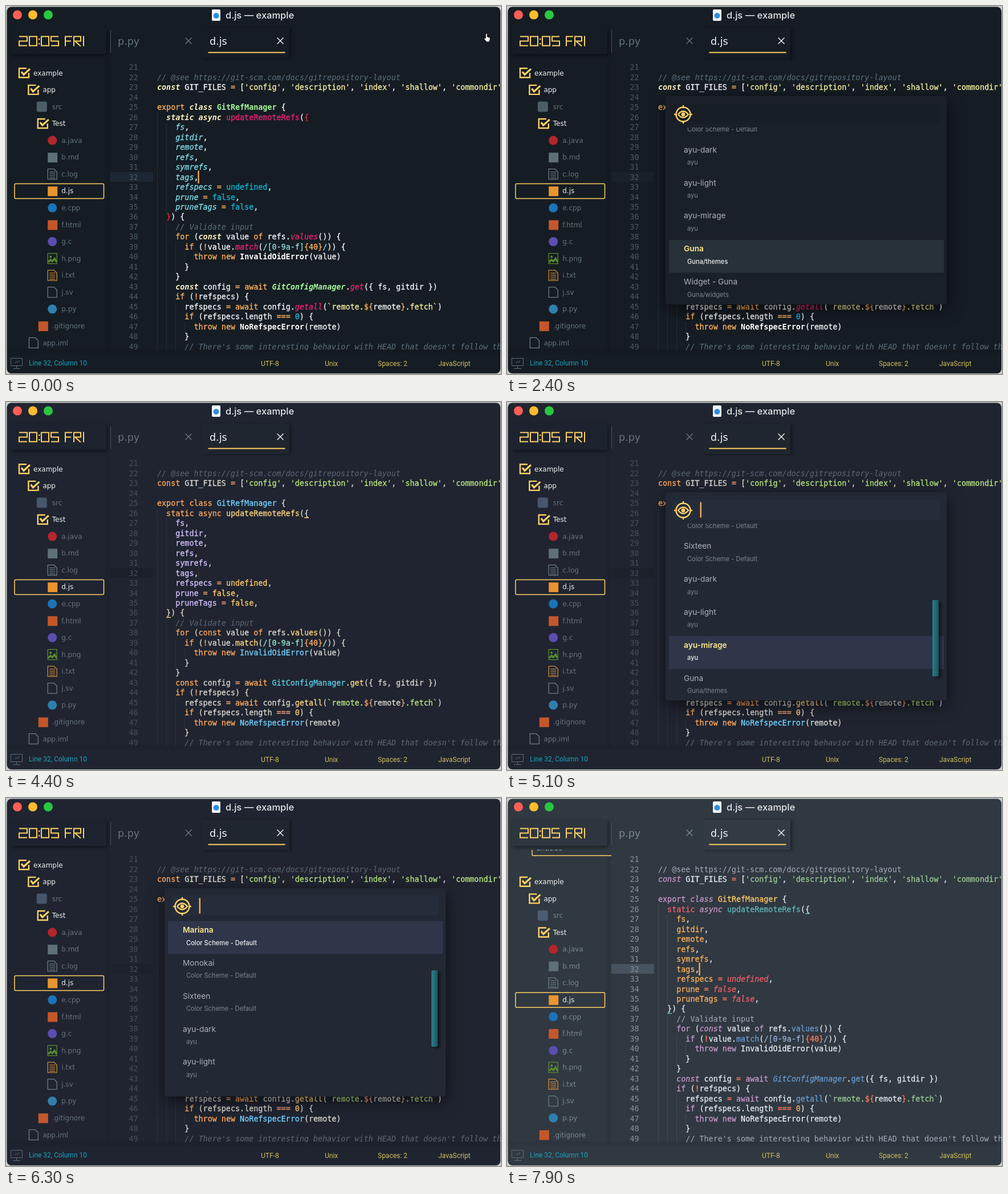
These frames come from a looping animation (868 by 645 pixels, 8000 ms). An HTML page with a canvas:

```html
<!DOCTYPE html>
<html lang="en">
<head>
<meta charset="utf-8">
<title>Editor colour schemes</title>
<style>
html, body { margin: 0; width: 100%; height: 100%; overflow: hidden; background: #c9ccc9; }
canvas { display: block; }
</style>
</head>
<body>
<canvas id="stage" width="868" height="645"></canvas>
<script>
const ctx = document.getElementById('stage').getContext('2d');
const LOOP = 8000, TICK = 100, GOLD = '#ffd166', CARET = '#f2a65a';
const UI = '"DejaVu Sans", sans-serif', MONO = '"DejaVu Sans Mono", monospace';
const INTER = 'Inter, sans-serif', ROBOTO = 'Roboto, sans-serif';

// Token styles: optional flags (b bold, i italic, u underlined), then the colour.
const themes = [
  { bg: '#151c23', raised: '#151c23', tab: '#151c23', panel: '#1a2027', input: '#171e26', row: '#27313a',
    line: '#1d2733', blurred: '#19212a', gutter: '#4a5a66', guide: '#232c34', dim: '#63747d', folder: '#4c5f69',
    comment: 'i#5c6f7b', string: '#f8f0a0', keyword: '#fcaf5c', storage: 'bi#fbf0c0', modifier: 'bi#fbf0c0',
    cls: 'b#a5f69c', ref: 'bi#a5f69c', fn: '#e6266f', param: 'i#7fe0ee', constant: '#12b3d8', number: '#12b3d8',
    method: 'i#e6266f', error: 'b#ffffff', op: '#fcaf5c', regex: '#8fd8dc', quant: '#fcaf5c', pair: '#e02c34', text: '#f4f6f8' },
  { bg: '#1f2430', raised: '#1d232e', tab: '#20262f', panel: '#222834', input: '#252c3a', row: '#2f364a',
    line: '#1a1f2a', blurred: '#1c212c', gutter: '#474e5a', guide: '#2a303c', dim: '#68737d', folder: '#47566a',
    comment: 'i#5c6773', string: '#bae67e', keyword: '#ffa759', storage: '#ffa759', modifier: '#ffa759',
    cls: '#73d0ff', ref: '#5ccfe6', fn: '#ffd580', param: '#d4bfff', constant: '#ffcc66', number: '#ffcc66',
    method: '#ffd580', error: '#73d0ff', op: '#f29e74', regex: '#95e6cb', quant: '#ffa759', pair: 'u#ffcc66', text: '#d9d7ce' },
  { bg: '#303841', raised: '#2d363e', tab: '#323b44', panel: '#333c45', input: '#38424c', row: '#45505b',
    line: '#47535e', blurred: '#3b4650', gutter: '#89929b', guide: '#414a53', dim: '#7b8890', folder: '#4a5d70',
    comment: '#a6acb9', string: '#99c794', keyword: '#c695c6', storage: 'i#c695c6', modifier: '#ec5f66',
    cls: '#fac863', ref: 'i#6699cc', fn: '#5fb4b4', param: '#f9ae58', constant: 'i#ec5f66', number: '#f9ae58',
    method: '#6699cc', error: '#e8ecf2', op: '#f97b58', regex: '#95b2d6', quant: '#f97b58', pair: 'u#5fb4b4', text: '#e2e6ed' },
];

const code = `
// @see https://git-scm.com/docs/gitrepository-layout
const GIT_FILES = ['config', 'description', 'index', 'shallow', 'commondir']

export class GitRefManager {
  static async updateRemoteRefs({
    fs,
    gitdir,
    remote,
    refs,
    symrefs,
    tags,
    refspecs = undefined,
    prune = false,
    pruneTags = false,
  }) {
    // Validate input
    for (const value of refs.values()) {
      if (!value.match(/[0-9a-f]{40}/)) {
        throw new InvalidOidError(value)
      }
    }
    const config = await GitConfigManager.get({ fs, gitdir })
    if (!refspecs) {
      refspecs = await config.getall(\`remote.\${remote}.fetch\`)
      if (refspecs.length === 0) {
        throw new NoRefspecError(remote)
      }
      // There's some interesting behavior with HEAD that doesn't follow the`.split('\n');

const grammar = new RegExp([
  '(?<comment>// .*)', "(?<string>'[^']*'|`remote\\.|\\.fetch`)",
  '(?<regex>/\\[.*?\\]|/(?=\\)))', '(?<quant>\\{40\\})',
  '(?<pair>(?<=\\()\\{$|\\}(?=\\) \\{))', '(?<op>\\$\\{|\\}(?=\\.f)|=+|!)',
  '(?<storage>\\b(?:const|class|async)\\b)', '(?<modifier>\\bstatic\\b)',
  '(?<keyword>\\b(?:export|for|of|if|throw|new|await)\\b)',
  '(?<cls>GitRefManager)', '(?<ref>GitConfigManager)', '(?<fn>updateRemoteRefs)',
  '(?<method>\\b(?:values|match|get|getall)(?=\\())',
  '(?<param>(?<=^ {4})\\w+(?=,| = [uf]))',
  '(?<constant>undefined|false)', '(?<number>\\b0\\b)', '(?<error>\\w+Error)', '(?<text>\\w+|[^\\s\\w])',
].join('|'), 'g');
const tokens = code.map(line => [...line.matchAll(grammar)].map(m =>
  ({ text: m[0], col: m.index, kind: Object.keys(m.groups).find(k => m.groups[k] !== undefined) })));

// name, indent level, icon, icon colour
const files = [
  ['example', 0, 'check'], ['app', 1, 'check'], ['src', 2, 'folder'], ['Test', 2, 'check'],
  ['a.java', 3, 'dot', '#b3262d'], ['b.md', 3, 'block', '#5f7078'], ['c.log', 3, 'lines', '#6d7c85'],
  ['d.js', 3, 'block', '#e8952f'], ['e.cpp', 3, 'dot', '#1b74b8'], ['f.html', 3, 'block', '#c4572a'],
  ['g.c', 3, 'dot', '#5c4db1'], ['h.png', 3, 'image', '#5a8f2c'], ['i.txt', 3, 'lines', '#d18a35'],
  ['j.sv', 3, 'doc', '#6d7c85'], ['p.py', 3, 'dot', '#2f7fae'], ['.gitignore', 2, 'block', '#c4572a'],
  ['app.iml', 1, 'doc', '#6d7c85'],
];

// Asterisks enclose the matched letters.
const commands = [
  'UI: Select *Color* Scheme', '*Co*nvert Case: *Lo*we*r* Case',
  ...['*R*emove Channel', '*R*emove Package', '*R*emove Repository', 'Add *R*epository'].map(s => 'Package *Co*ntr*ol*: ' + s),
  '*Co*de Folding: F*ol*d Tag Att*r*ibutes',
  ...['Upg*r*ade Package', 'C*r*eate Package File', 'Discove*r* Packages'].map(s => 'Package *Co*ntr*ol*: ' + s),
];
const shortcuts = { 1: '⌘K, ⌘L', 6: '⌘K, ⌘T' };
const schemes = [
  ...['Mariana', 'Monokai', 'Sixteen'].map(s => [s, 'Color Scheme - Default']),
  ...['ayu-dark', 'ayu-light', 'ayu-mirage'].map(s => [s, 'ayu']),
  ['Guna', 'Guna/themes'], ['Widget - Guna', 'Guna/widgets'],
];

// Linear interpolation over time, value pairs.
function track(t, ...keys) {
  for (let i = 0; i + 2 < keys.length; i += 2) {
    const [t0, v0, t1, v1] = keys.slice(i, i + 4);
    if (t <= t1) return t <= t0 ? v0 : v0 + (v1 - v0) * (t - t0) / (t1 - t0);
  }
  return keys[keys.length - 1];
}
const caretAlpha = t => track(t, 0, 1, 400, 0, 600, 0, 900, 1, 1500, 1, 1800, 0, 1900, 1, 2100, 1, 2400, 0,
  2700, 0, 2900, 1, 3400, 1, 3600, 0, 3900, 0, 4100, 1, 4200, 1, 4400, 0.06, 4500, 0.06, 4600, 1, 4800, 1, 5000, 0,
  5100, 1, 5400, 1, 5600, 0, 5800, 0, 6000, 1, 7100, 1, 7300, 0, 7700, 0, 7900, 1);
const bump = (t, start) => t > start && t < start + 500 ? 31 * Math.sin(Math.PI * (t - start) / 500) : 0;
const chosenScheme = t => t < 2800 ? 6 : t < 5500 ? 5 : t < 5800 ? 4 : t < 6000 ? 3 : t < 6100 ? 2 : t < 6200 ? 1 : 0;

function rect(x, y, w, h, fill, r = 0) {
  ctx.fillStyle = fill;
  ctx.beginPath();
  ctx.roundRect(x, y, w, h, r);
  ctx.fill();
}
function frame(x, y, w, h, colour, width = 1, r = 0) {
  ctx.strokeStyle = colour;
  ctx.lineWidth = width;
  ctx.beginPath();
  ctx.roundRect(x, y, w, h, r);
  ctx.stroke();
}
function circle(x, y, r, fill) {
  ctx.fillStyle = fill;
  ctx.beginPath();
  ctx.arc(x, y, r, 0, 7);
  ctx.fill();
}
function path(points, colour, width = 1) {
  ctx.strokeStyle = colour;
  ctx.lineWidth = width;
  ctx.beginPath();
  for (let i = 0; i < points.length; i += 2) ctx.lineTo(points[i], points[i + 1]);
  ctx.stroke();
}
// y is the optical middle of the line; returns the advance width.
function text(str, x, y, colour, size, family, style = '', align = 'left') {
  ctx.font = `${style} ${size}px ${family}`;
  ctx.textAlign = align;
  ctx.fillStyle = colour;
  ctx.fillText(str, x, y + size * 0.35);
  return ctx.measureText(str).width;
}
function shadowed(dx, dy, blur, alpha, draw) {
  ctx.save();
  Object.assign(ctx, { shadowColor: `rgba(0,0,0,${alpha})`, shadowOffsetX: dx, shadowOffsetY: dy, shadowBlur: blur });
  draw();
  ctx.restore();
}
function clipped(x, y, w, h, draw) {
  ctx.save();
  ctx.beginPath();
  ctx.rect(x, y, w, h);
  ctx.clip();
  draw();
  ctx.restore();
}

function drawIcon(kind, x, y, colour, theme) {
  if (kind === 'check') {
    path([x + 4, y - 8, x - 9, y - 8, x - 9, y + 8, x + 8, y + 8, x + 8, y], GOLD, 2.4);
    path([x - 5, y - 2, x - 1, y + 3, x + 10, y - 7], GOLD, 3.2);
  } else if (kind === 'folder') rect(x - 11, y - 9, 18, 18, theme.folder, 3);
  else if (kind === 'dot') circle(x, y, 8, colour);
  else if (kind === 'block') rect(x - 8, y - 8, 17, 17, colour);
  else if (kind === 'image') {
    frame(x - 8, y - 9, 16, 18, colour, 1.3);
    circle(x - 3, y - 3, 2, colour);
    path([x - 7, y + 6, x - 3, y + 2, x, y + 5, x + 4, y, x + 7, y + 6], colour, 3);
  } else {
    path([x - 8, y - 9, x + 3, y - 9, x + 8, y - 4, x + 8, y + 9, x - 8, y + 9, x - 8, y - 9.6], colour, 1.3);
    if (kind === 'lines') for (let dy = -4; dy < 8; dy += 3.5) path([x - 5, y + dy, x + 5, y + dy], colour, 1.2);
  }
}

function drawSidebar(theme, shift) {
  clipped(8, 91, 175, 513, () => {
    frame(44, 45 + shift, 145, 26.5, GOLD, 1.5, 2);
    text('untitled', 51, 58.5 + shift, '#e8ebee', 12, UI);
    files.forEach(([name, level, icon, colour], i) => {
      const y = 117.3 + i * 29.57 + shift, x = 32 + level * 16.4;
      if (name === 'd.js') frame(15, y - 12.8, 156.5, 26, GOLD, 1.5, 2);
      drawIcon(icon, x, y, colour, theme);
      text(name, x + 16, y, icon === 'check' || name === 'd.js' ? '#eef0f2' : theme.dim, 12, UI);
    });
  });
}

function drawChrome(theme) {
  circle(20, 15.5, 8, '#ff5f57');
  circle(47, 15.5, 8, '#febc2e');
  circle(74, 15.5, 8, '#28c840');
  rect(361, 6, 15, 20, '#f4f6f8', 2);
  circle(368.5, 17, 5, '#2c8fe0');
  text('d.js — example', 385, 16.2, '#e4e7ea', 16.5, INTER, '500');

  shadowed(2, 3, 6, 0.45, () => rect(9, 38, 167, 46, theme.raised, 3));
  shadowed(3, 1, 5, 0.4, () => rect(344, 38, 153, 53, theme.tab));
  rect(183, 42, 1, 40, '#46525c');
  text('p.py', 196, 62, theme.dim, 17.5, UI);
  text('d.js', 357, 62, '#f2f4f6', 17.5, UI);
  for (const [x, colour] of [[320, theme.dim], [481, '#f2f4f6']]) {
    path([x - 5.5, 55.5, x + 5.5, 66.5], colour, 1.4);
    path([x + 5.5, 55.5, x - 5.5, 66.5], colour, 1.4);
  }
  rect(354.5, 80.5, 135, 2, GOLD);

  const glyphs = {
    2: [0, 0, 14, 0, 14, 8, 0, 8, 0, 16, 14, 16], 0: [0, 0, 13, 0, 13, 16, 0, 16, 0, -1],
    5: [13, 0, 0, 0, 0, 8, 13, 8, 13, 16, 0, 16], F: [12, 0, 0, 0, 0, 17], R: [0, 17, 0, 0, 12, 0, 12, 8, 2, 8, 12, 17],
    I: [0, -1, 0, 17], f: [0, 8, 10, 8],
  };
  [['2', 23], ['0', 41], ['0', 62], ['5', 79], ['F', 104], ['f', 104], ['R', 119], ['I', 136]].forEach(([g, x]) =>
    path(glyphs[g].map((v, i) => v + (i % 2 ? 53.5 : x)), GOLD, 2));
  rect(57, 57, 2.4, 2.4, GOLD);
  rect(57, 65, 2.4, 2.4, GOLD);
}

function drawStatus(theme) {
  shadowed(0, -1, 4, 0.5, () => rect(2, 606, 865, 1, theme.bg));
  frame(8.5, 617.5, 20, 13, '#5d6c76');
  path([18.5, 631, 18.5, 635], '#5d6c76');
  path([12, 635.5, 25, 635.5], '#5d6c76');
  path([15, 626, 18, 623, 20, 625, 23, 621], '#5d6c76');
  text('Line 32, Column 10', 40, 625.5, '#1aa3bf', 12, ROBOTO);
  [['UTF-8', 447], ['Unix', 559], ['Spaces: 2', 652], ['JavaScript', 758]].forEach(([s, x]) =>
    text(s, x, 626.5, '#d2be58', 12, ROBOTO));
}

function drawEditor(theme, focused, caret) {
  const lineY = i => 107.6 + i * 17.48, colX = c => 265 + c * 8.06;
  rect(183, 291, 75, 17, focused ? theme.line : theme.blurred);
  clipped(180, 102, 687, 502, () => {
    code.forEach((line, i) => {
      const y = lineY(i), indent = i === 3 ? 0 : line.search(/\S/);
      text(21 + i, 231.5, y, theme.gutter, 13.39, MONO, '', 'right');
      for (let c = 0; c < indent; c += 2) rect(Math.round(colX(c)), y - 8.7, 1, 17.5, theme.guide);
      for (const token of tokens[i]) {
        const [, flags, colour] = theme[token.kind].match(/(\w*)(#.*)/);
        const style = (flags.includes('i') ? 'italic ' : '') + (flags.includes('b') ? 'bold' : '');
        const x = colX(token.col);
        text(token.text, x, y, flags === 'u' ? theme.text : colour, 13.39, MONO, style);
        if (token.kind !== 'comment' && !flags.includes('b')) {
          ctx.strokeStyle = ctx.fillStyle;
          ctx.lineWidth = 0.3;
          ctx.strokeText(token.text, x, y + 13.39 * 0.35);
        }
        if (flags === 'u') rect(x, y + 7, 8, 1.5, colour);
      }
    });
  });
  if (focused) {
    ctx.globalAlpha = caret;
    rect(336.3, 288.5, 2.4, 22.5, CARET);
    ctx.globalAlpha = 1;
  }
}

function drawTarget() {
  const x = 309, y = 190;
  ctx.strokeStyle = GOLD;
  ctx.lineWidth = 2.4;
  ctx.beginPath();
  ctx.arc(x, y, 12.5, 0, 7);
  for (const [dx, dy] of [[0, 1], [1, 0], [0, -1], [-1, 0]]) {
    ctx.moveTo(x + dx * 11, y + dy * 11);
    ctx.lineTo(x + dx * 16, y + dy * 16);
  }
  ctx.moveTo(x - 9, y);
  ctx.quadraticCurveTo(x, y - 11, x + 9, y);
  ctx.quadraticCurveTo(x, y + 11, x - 9, y);
  ctx.stroke();
  circle(x, y, 3.4, GOLD);
}

function drawCommands(theme) {
  rect(284, 216, 482, 32, theme.row);
  commands.forEach((command, i) => {
    const y = 231.3 + i * 32.23;
    let x = 310;
    command.split('*').forEach((part, k) => {
      const match = k % 2;
      const colour = i ? (match ? '#eceff1' : '#b3b8bc') : (match ? '#a5f69c' : '#ffe88f');
      x += text(part, x, y, colour, 13.6, INTER, match ? 'bold' : i ? '' : '500');
    });
    if (shortcuts[i]) text(shortcuts[i], 739, y, '#8f979d', 11.5, INTER, '', 'right');
  });
}

function drawSchemes(theme, t, compact) {
  const scroll = t < 3200 ? 152.8 : track(t, 6000, 94.5, 6100, 58, 6200, 25, 6300, 0);
  const chosen = chosenScheme(t);
  schemes.forEach(([name, group], i) => {
    const y = 215.7 + i * 57.85 - scroll, on = i === chosen;
    if (on) rect(284, y, 482, 57.6, theme.row);
    text(name, 310, y + 15.5, on ? '#ffe88f' : '#adb3b9', 13.7, INTER, on ? '600' : '');
    text(group, 316, y + 38, on ? '#eceff1' : '#7f878f', 11.1, INTER, on ? '500' : '');
  });
  const top = 302 + scroll * 0.475, y = compact ? 216 + (top - 216) * 0.924 : top;
  const teal = ctx.createLinearGradient(746, 0, 757, 0);
  teal.addColorStop(0, '#2a7f8b');
  teal.addColorStop(1, '#1a545f');
  ctx.globalAlpha = track(t, 2100, 1, 2400, 0, 2700, 0, 2800, 1);
  shadowed(4, 3, 5, 0.55, () => rect(746, y, 11, compact ? 111 : 134, teal, 2));
  ctx.globalAlpha = 1;
}

function drawPalette(theme, t, listing, compact, caret) {
  const bottom = compact ? 499 : 523;
  shadowed(0, 8, 28, 0.6, () => rect(278, 158, 493, bottom - 158, theme.panel, 4));
  rect(290, 171, compact ? 462 : 469, 35, theme.input, 3);
  drawTarget();
  let caretX = 338.5;
  if (!listing) {
    rect(338, 174, 46, 29, theme.row, 3);
    caretX = 340 + text('color', 340, 190, '#f3cfae', 18.2, INTER);
  }
  ctx.globalAlpha = caret;
  rect(caretX, 175.5, 2.6, 27, CARET);
  ctx.globalAlpha = 1;
  clipped(284, 213, 482, bottom - 6 - 213, () => listing ? drawSchemes(theme, t, compact) : drawCommands(theme));
}

function drawHand() {
  const hand = new Path2D('M841 49q1.5-2 3 0v5l4 1q1.5.5 1 3l-1.5 5h-5l-4-5q-1-2 1-2l1.5 1z');
  ctx.fillStyle = '#fff';
  ctx.strokeStyle = '#000';
  ctx.lineWidth = 1;
  ctx.fill(hand);
  ctx.stroke(hand);
}

function draw(t) {
  const theme = themes[t < 3100 ? 0 : t < 6500 ? 1 : 2];
  const open = t >= 1200 && t < 3200 || t >= 4600 && t < 6800;
  const listing = t >= 1900 && t < 3200 || t >= 5100;
  const compact = t >= 3100 && t < 3200 || t >= 6500;
  const caret = caretAlpha(t);
  rect(0, 0, 868, 645, '#c9ccc9');
  rect(1.5, 1.5, 865.5, 642.5, theme.bg, 8);
  shadowed(1, 0, 4, 0.5, () => rect(176.5, 94, 1, 510, theme.bg));
  drawChrome(theme);
  drawSidebar(theme, bump(t, 3900) + bump(t, 7700));
  drawEditor(theme, !open, caret);
  drawStatus(theme);
  if (open) drawPalette(theme, t, listing, compact, caret);
  if (t < 100) drawHand();
}

let shown = -1;
function tick() {
  const t = Math.floor(performance.now() % LOOP / TICK) * TICK;
  if (t !== shown) draw(shown = t);
  requestAnimationFrame(tick);
}
tick();
</script>
</body>
</html>
```
